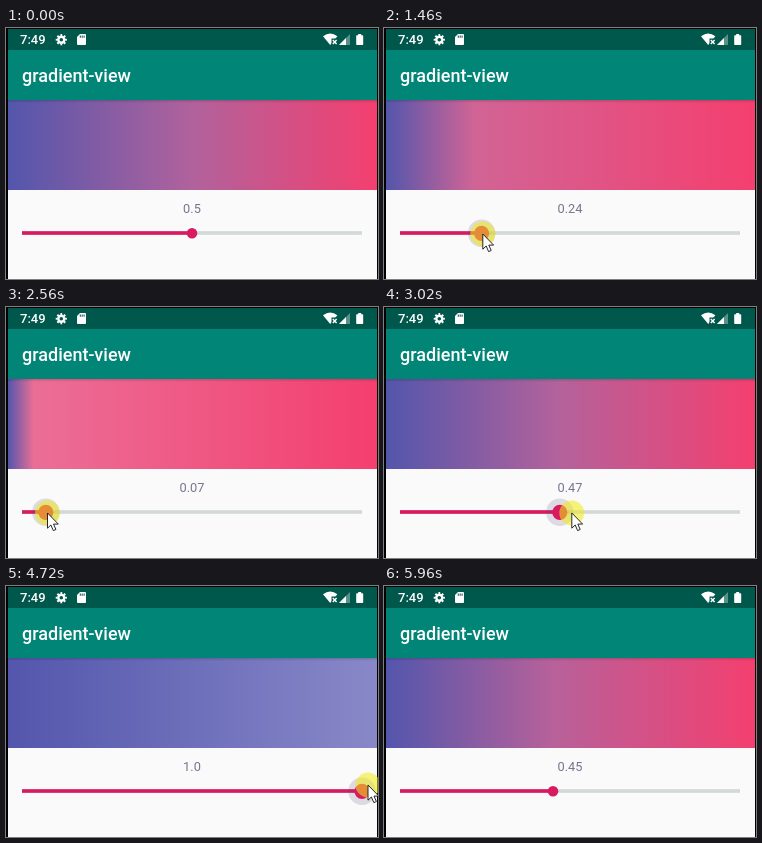
Recreate the animation shown at these times as an HTML page. Size 372 by 251 pixels, loop 6.81 s.

```html
<!DOCTYPE html>
<html lang="en">
<head>
<meta charset="utf-8">
<title>gradient-view</title>
<style>
  html, body { margin: 0; width: 100%; height: 100%; overflow: hidden; background: #000; }
  svg { display: block; width: 372px; height: 251px; }
  text { font-family: Roboto, sans-serif; }
  .bar { fill: #fff; font-weight: 500; }
</style>
</head>
<body>
<svg viewBox="0 0 372 251">
  <defs>
    <linearGradient id="fade" gradientUnits="userSpaceOnUse" x1="2" y1="0" x2="371" y2="0">
      <stop offset="0" stop-color="#5356ac"/>
      <stop id="mid" offset=".5" stop-color="#b0629c"/>
      <stop offset="1" stop-color="#f43f6f"/>
    </linearGradient>
    <linearGradient id="shade" x2="0" y2="1">
      <stop offset="0" stop-opacity=".16"/>
      <stop offset="1" stop-opacity="0"/>
    </linearGradient>
  </defs>
  <rect width="372" height="251"/>
  <rect x="2" y="1" width="369" height="250" fill="#fafafa"/>
  <rect x="2" y="1" width="369" height="21" fill="#00574b"/>
  <rect x="2" y="22" width="369" height="50" fill="#008577"/>
  <rect x="2" y="72" width="369" height="90" fill="url(#fade)"/>
  <rect x="2" y="72" width="369" height="3" fill="url(#shade)"/>

  <text class="bar" x="14" y="16.3" font-size="13">7:49</text>
  <text class="bar" x="16" y="54" font-size="18">gradient-view</text>

  <!-- status icons -->
  <g fill="none" stroke="#fff">
    <circle cx="55.3" cy="11.7" r="3" stroke-width="2.4"/>
    <circle cx="55.3" cy="11.7" r="4.7" stroke-width="1.8" pathLength="16" stroke-dasharray="1 1" stroke-dashoffset=".5"/>
  </g>
  <path fill="#fff" d="M74 6h5q1 0 1 1v9q0 1-1 1h-7q-1 0-1-1V9z"/>
  <path stroke="#00574b" d="M74.3 7.5v2.3M76.2 7.5v2.3M78.1 7.5v2.3"/>
  <path fill="#fff" d="M317 8.3q7.2-5.6 14.4 0L324.2 17z"/>
  <path fill="#00574b" d="M325.5 10.5h7V18h-7z"/>
  <path stroke="#fff" stroke-width="1.4" d="M326.8 12l3.8 4M330.6 12l-3.8 4"/>
  <path fill="#fff" fill-opacity=".35" d="M344 6v11h-11z"/>
  <path fill="#fff" d="M340 10v7h-7z"/>
  <path fill="#fff" d="M352.2 6h3v1.2h1.3q.7 0 .7.7v8.4q0 .7-.7.7h-5.6q-.7 0-.7-.7V7.9q0-.7.7-.7h1.3z"/>

  <text id="label" x="186" y="185" font-size="12.8" text-anchor="middle" fill="#7b7390">0.5</text>

  <rect x="16" y="203.2" width="340" height="3.6" fill="#d3d8d8"/>
  <rect id="fill" x="16" y="203.2" width="170" height="3.6" fill="#d81b60"/>
  <circle id="ripple" cy="205.3" r="13.7" fill="#5a466e" fill-opacity=".18"/>
  <circle id="thumb" cx="186" cy="205.3" r="5.3" fill="#d81b60"/>
  <circle id="press" r="12.5" fill="#f0eb14" fill-opacity=".55"/>
  <path id="cursor" d="M0 0v15.2l3.4-3.2 2.4 5.6 2.6-1.1-2.4-5.4h4.8z" fill="#fff" stroke="#111" stroke-width=".9"/>
</svg>
<script>
const LOOP = 6810, START = 140, STEP = 77.6;
const ARRIVE = 7, PRESS = 9, RELEASE = 71, GONE = 75;

// [step, slider value, pixels the pointer runs ahead of the thumb]
const drag = [
  [PRESS, .5, 0], [11, .49, 3], [21, .08, 0], [25, 0, 0], [30, 0, 0],
  [37, .47, 12], [45, .79, 7], [51, 1, 6], [59, 1, 6], [RELEASE, .45, 0]
];

const $ = id => document.getElementById(id);
const ramp = (k, from, to) => Math.min(1, Math.max(0, (k - from) / (to - from)));

function track(k, col) {
  let v = drag[0][col];
  for (let i = 1; i < drag.length; i++) {
    v += (drag[i][col] - drag[i - 1][col]) * ramp(k, drag[i - 1][0], drag[i][0]);
  }
  return v;
}

// quadratic through the colours at 0, 0.5 and 1
function midColor(v) {
  const a = 2 * (v - .5) * (v - 1), b = 4 * v * (1 - v), c = 2 * v * (v - .5);
  const mix = (p, q, r) => Math.round(a * p + b * q + c * r);
  return `rgb(${mix(246, 177, 136)},${mix(116, 98, 136)},${mix(153, 156, 200)})`;
}

function set(id, attrs) {
  for (const name in attrs) $(id).setAttribute(name, attrs[name]);
}

function show(id, on) { $(id).style.display = on ? "" : "none"; }

function draw(time) {
  const k = Math.floor((time - START + 5) / STEP);
  const v = Math.round(track(k, 1) * 100) / 100;
  const x = 16 + 340 * v;
  const away = 1 - ramp(k, 0, ARRIVE), leave = ramp(k, RELEASE, GONE);
  const px = x + track(k, 2) + 26 * away + 12 * leave;
  const py = 206 - 7 * v ** 8 + 42 * away + 46 * leave;
  const held = k >= PRESS && k < RELEASE;

  set("mid", { offset: v, "stop-color": midColor(v) });
  $("label").textContent = Number.isInteger(v) ? v.toFixed(1) : v;
  set("fill", { width: x - 16 });
  set("thumb", { cx: x, r: held ? 7.6 : 5.3 });
  set("ripple", { cx: x });
  set("press", { cx: px, cy: py });
  set("cursor", { transform: `translate(${px} ${py})` });
  show("ripple", held);
  show("press", held);
  show("cursor", k >= 0 && k < GONE);
}

const begin = performance.now();
function frame() {
  draw((performance.now() - begin) % LOOP);
  requestAnimationFrame(frame);
}
frame();
</script>
</body>
</html>
```
